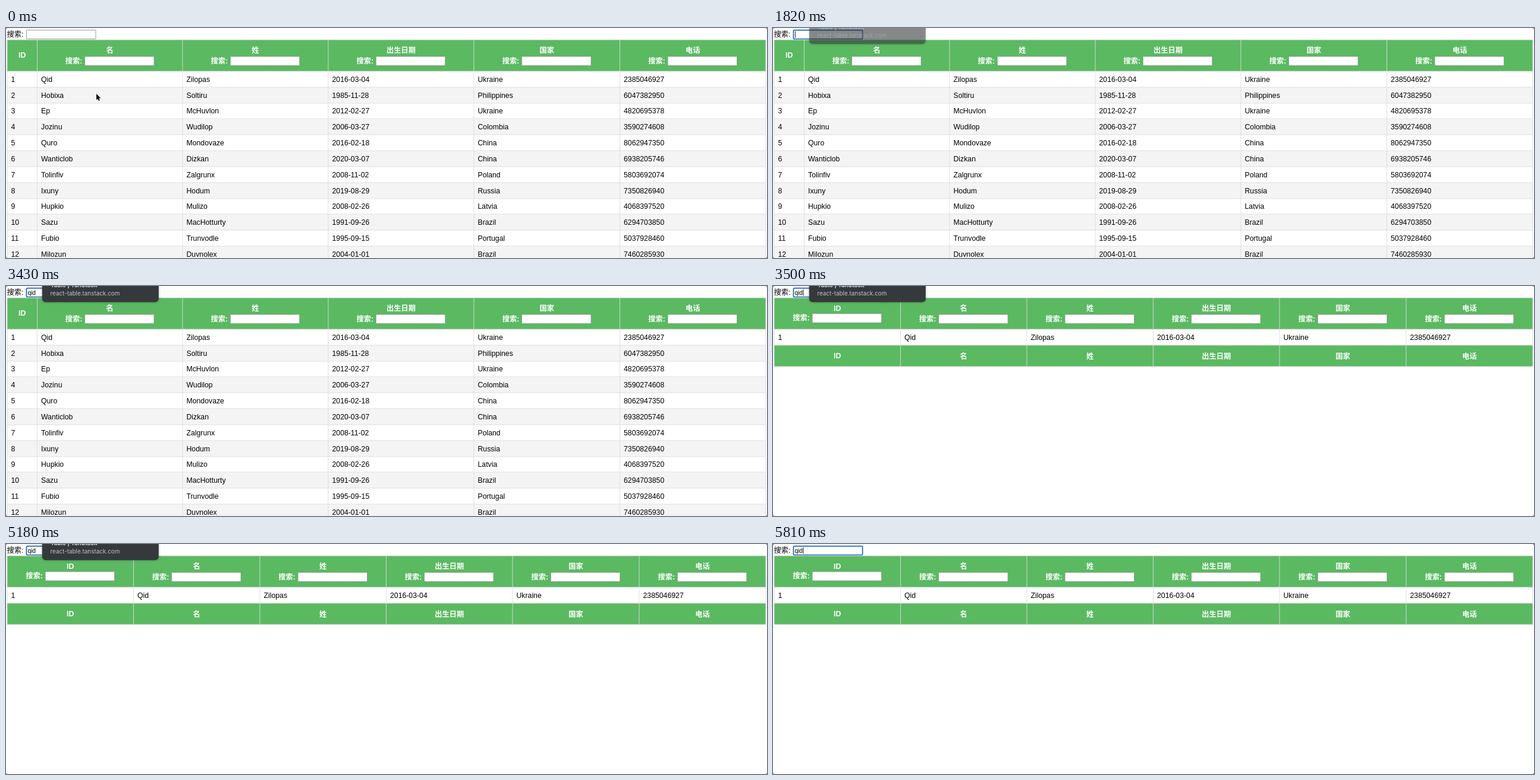
Animation of 1280 by 388 pixels, one loop 5.88 s. Source, as an HTML page with a canvas:

```html
<!DOCTYPE html>
<html lang="zh-CN">
<head>
<meta charset="utf-8">
<title>表格搜索</title>
<style>
  html, body { margin: 0; width: 100%; height: 100%; overflow: hidden; background: #fff; }
  canvas { display: block; width: 1280px; height: 388px; }
</style>
</head>
<body>
<canvas id="stage" width="1280" height="388"></canvas>
<script>
const ctx = document.getElementById('stage').getContext('2d');
const W = 1280, H = 388, LOOP = 5880, STEP = 70;
const GREEN = '#5bb962', LINE = '#dcdcdc', INK = '#000';
const SANS = '"Liberation Sans", "Noto Sans CJK SC", "Noto Sans CJK", sans-serif';
const BODY = '12.27px ' + SANS, BOLD = 'bold ' + BODY, FIELD = '10.2px ' + SANS;
const TIP = 'Inter, sans-serif';

const TOP = 20, BODY_TOP = 73, ROW = 26.82;
const WIDE = [2, 52.5, 297, 542, 787, 1032.5, 1278];
const EQUAL = [2, 214.5, 427, 639.5, 852, 1065, 1278];
const HEADS = ['ID', '名', '姓', '出生日期', '国家', '电话'];
const ROWS = `Qid,Zilopas,2016-03-04,Ukraine,2385046927
Hobixa,Soltiru,1985-11-28,Philippines,6047382950
Ep,McHuvlon,2012-02-27,Ukraine,4820695378
Jozinu,Wudilop,2006-03-27,Colombia,3590274608
Quro,Mondovaze,2016-02-18,China,8062947350
Wanticlob,Dizkan,2020-03-07,China,6938205746
Tolinfiv,Zalgrunx,2008-11-02,Poland,5803692074
Ixuny,Hodum,2019-08-29,Russia,7350826940
Hupkio,Mulizo,2008-02-26,Latvia,4068397520
Sazu,MacHotturty,1991-09-26,Brazil,6294703850
Fubio,Trunvodle,1995-09-15,Portugal,5037928460
Milozun,Duvnolex,2004-01-01,Brazil,7460285930`
  .split('\n').map((line, i) => [String(i + 1), ...line.split(',')]);

// Timing in ms
const FOCUS = 420, FILTER = 3500, BLINK = 560;
const KEYS = [['q', 2170], ['i', 2310], ['d', 2380]];
const PATH = [[0, 152, 111], [70, 152, 111], [210, 138, 72], [350, 112, 22],
              [420, 106, 12], [630, 111, 7], [840, 112, 5], [980, 114, -14]];

const ramp = (t, a, b) => Math.min(1, Math.max(0, (t - a) / (b - a)));

function text(str, x, y, font, color, align = 'left') {
  ctx.font = font;
  ctx.fillStyle = color;
  ctx.textAlign = align;
  ctx.fillText(str, x, y);
}

function rect(x, y, w, h, color) {
  ctx.fillStyle = color;
  ctx.fillRect(x, y, w, h);
}

function box(x, y, w, h, r, stroke, width) {
  ctx.beginPath();
  ctx.roundRect(x, y, w, h, r);
  ctx.fillStyle = '#fff';
  ctx.fill();
  ctx.lineWidth = width;
  ctx.strokeStyle = stroke;
  ctx.stroke();
}

const hLine = y => rect(2, Math.round(y) - 0.5, 1276, 0.9, LINE);

function vLines(cols, y0, y1) {
  for (const x of cols) rect(x - 0.5, y0, 0.9, y1 - y0, LINE);
}

function headCell(label, center, y, search) {
  text(label, center, y, BOLD, '#fff', 'center');
  if (!search) return;
  const dy = label === 'ID' ? -1.3 : 0;
  text('搜索:', center - 75, 59.7 + dy, BOLD, '#fff');
  box(center - 42.2, 48 + dy, 116.5, 15.3, 0, '#8b908b', 0.8);
}

function heads(cols, footer) {
  const filtered = cols === EQUAL;
  HEADS.forEach((label, i) => {
    const center = (cols[i] + cols[i + 1]) / 2;
    const id = label === 'ID';
    if (footer) headCell(label, center, id ? 122.2 : 122.8, false);
    else if (id && !filtered) headCell(label, center, 49.8, false);
    else headCell(label, center, id ? 41.8 : 42.3, true);
  });
}

function table(filtered) {
  const cols = filtered ? EQUAL : WIDE;
  const rows = filtered ? ROWS.slice(0, 1) : ROWS;
  rect(2, TOP, 1276, BODY_TOP - TOP, GREEN);
  rows.forEach((row, i) => {
    const y = BODY_TOP + i * ROW;
    if (i % 2) rect(2, y, 1276, ROW, '#f4f4f4');
    row.forEach((cell, c) => text(cell, cols[c] + 6.5, y + 17.8, BODY, INK));
  });
  const end = BODY_TOP + rows.length * ROW;
  if (filtered) rect(2, end, 1276, 36, GREEN);
  const bottom = filtered ? end + 36 : end;
  vLines(cols, TOP, bottom);
  hLine(TOP);
  rows.forEach((_, i) => hLine(BODY_TOP + i * ROW));
  hLine(end);
  if (filtered) hLine(bottom);
  heads(cols, false);
  if (filtered) heads(cols, true);
}

function caretOn(t) {
  if (t < FOCUS) return false;
  const last = KEYS.filter(k => k[1] <= t).pop();
  return Math.floor((t - (last ? last[1] : FOCUS)) / BLINK) % 2 === 0;
}

function searchField(t) {
  text('搜索:', 1.5, 14.9, BODY, INK);
  if (t < FOCUS) box(34.4, 3.4, 116.6, 15, 0, '#858585', 0.8);
  else box(34.4, 3.6, 116.2, 14.9, 1.8, '#1f66b8', 1.7);
  const typed = KEYS.filter(k => k[1] <= t).map(k => k[0]).join('');
  text(typed, 36.4, 14.6, FIELD, INK);
  if (caretOn(t)) rect(typed ? 37 + ctx.measureText(typed).width : 37, 5.5, 0.9, 11, '#111');
}

function hoverCard(t) {
  const alpha = ramp(t, 1680, 1960) * (1 - ramp(t, 5180, 5460));
  if (!alpha) return;
  ctx.save();
  ctx.globalAlpha = alpha;
  ctx.shadowColor = 'rgba(0,0,0,.3)';
  ctx.shadowBlur = 4;
  ctx.beginPath();
  ctx.roundRect(60.8, -30, 196, 57.3, 6);
  ctx.fillStyle = '#35393b';
  ctx.fill();
  ctx.shadowColor = 'transparent';
  text('Table | TanStack', 75, 2.3, '600 9.8px ' + TIP, '#f4f5f5');
  text('react-table.tanstack.com', 74.5, 16.3, '9.9px ' + TIP, '#bfc3c6');
  ctx.restore();
}

function pointer(t) {
  const n = PATH.findIndex(p => p[0] > t);
  if (n < 1) return;
  const [a, b] = [PATH[n - 1], PATH[n]];
  const k = ramp(t, a[0], b[0]);
  const x = a[1] + (b[1] - a[1]) * k, y = a[2] + (b[2] - a[2]) * k;
  ctx.save();
  ctx.translate(x, y);
  const beam = y < 19;
  const shape = new Path2D(beam
    ? 'M-2.5-5.5Q0-5.5 0-3.8Q0-5.5 2.5-5.5M0-4V4M-2.5 5.5Q0 5.5 0 3.8Q0 5.5 2.5 5.5M-1.3 1.5H1.3'
    : 'M0 0V10.4L2.4 8.2L4 12L5.8 11.2L4.2 7.6H7.4Z');
  ctx.lineJoin = 'round';
  ctx.strokeStyle = '#fff';
  ctx.lineWidth = beam ? 2.2 : 1.6;
  ctx.stroke(shape);
  if (beam) {
    ctx.strokeStyle = '#222';
    ctx.lineWidth = 1;
    ctx.stroke(shape);
  } else {
    ctx.fillStyle = '#000';
    ctx.fill(shape);
  }
  ctx.restore();
}

function draw(t) {
  rect(0, 0, W, H, '#555');
  ctx.save();
  // Rounded window corners
  ctx.beginPath();
  ctx.roundRect(0, 0, W, H, 3);
  ctx.clip();
  rect(0, 0, W, H, '#fff');
  table(t >= FILTER);
  searchField(t);
  hoverCard(t);
  pointer(t);
  ctx.restore();
}

const start = performance.now();
function tick() {
  const t = (performance.now() - start) % LOOP;
  draw(Math.floor(t / STEP) * STEP);
  requestAnimationFrame(tick);
}
tick();
</script>
</body>
</html>
```
